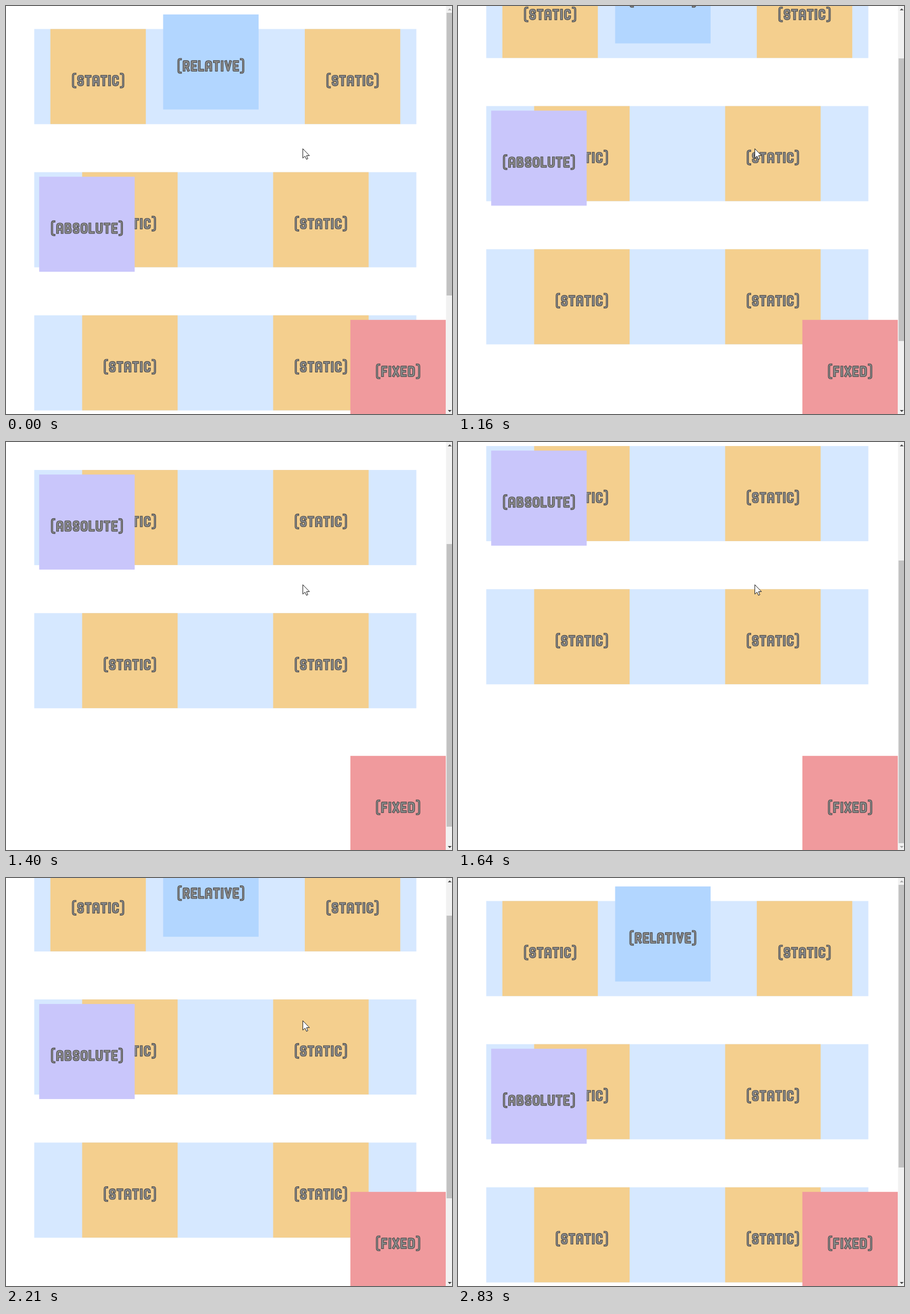
Write an HTML page that moves like this. It is 782 px wide and 716 px high and loops after 3600 ms.

```html
<!DOCTYPE html>
<html lang="en">
<head>
<meta charset="utf-8">
<title>CSS positioning</title>
<style>
  html, body { margin: 0; width: 100%; height: 100%; overflow: hidden; background: #fff; }
  svg { display: block; width: 782px; height: 716px; }
  .ink path { fill: none; stroke-linejoin: round; stroke-linecap: square; }
  .edge path { stroke: #4b4b4b; stroke-width: 4.7; }
  .core path { stroke: #8b8b8b; stroke-width: 2.5; }
  .edge .hook { stroke-width: 3.7; }
  .core .hook { stroke-width: 1.6; }
  text { font: 25px Roboto, sans-serif; text-anchor: middle; fill: none; }
</style>
</head>
<body>
<svg viewBox="0 0 782 716">
  <rect width="782" height="716" fill="#fff"/>
  <g id="page"></g>
  <g id="pinned"></g>
  <rect x="771.5" width="10.5" height="716" fill="#f1f1f1"/>
  <rect id="thumb" x="772.5" y="12" width="9.5" height="496" fill="#c1c1c1"/>
  <path id="up" d="M774.7 7.6L778 4.2L781.3 7.6Z"/>
  <path id="down" d="M774.7 709L778 712.4L781.3 709Z"/>
  <path id="cursor" d="M0 0V16.6L3.9 13.1L6.4 18.7L8.9 17.6L6.5 12.2H11.7Z" fill="#fff" stroke="#222" stroke-width="1" stroke-linejoin="round"/>
</svg>
<script>
const NS = 'http://www.w3.org/2000/svg';
const $ = id => document.getElementById(id);

function add(parent, tag, attrs) {
  const el = parent.appendChild(document.createElementNS(NS, tag));
  for (const k in attrs) el.setAttribute(k, attrs[k]);
  return el;
}

// Lettering skeletons: [advance, width, path], cap height 15.
const GLYPHS = {
  '[': [9, 4, 'M4 -4.3H3Q0 -4.3 0 -1V16Q0 19.3 3 19.3H4'],
  ']': [9, 4, 'M0 -4.3H1Q4 -4.3 4 -1V16Q4 19.3 1 19.3H0'],
  S: [13.5, 7.2, 'M7.2 3Q7.2 0 4.5 0H2.7Q0 0 0 3V4.5Q0 7.3 2.7 7.3H4.5Q7.2 7.3 7.2 10V12Q7.2 15 4.5 15H2.7Q0 15 0 12'],
  T: [13, 7.2, 'M0 0H7.2M3.6 0V15'],
  A: [14.5, 8, 'M0 15V4Q0 0 4 0Q8 0 8 4V15M0 9.5H8'],
  I: [7, 0, 'M0 0V15'],
  C: [14, 7.5, 'M7.5 3.5Q7.5 0 4 0H3.5Q0 0 0 3.5V11.5Q0 15 3.5 15H4Q7.5 15 7.5 11.5'],
  R: [14, 7.5, 'M0 15V0H4.5Q7.5 0 7.5 3V5.5Q7.5 8.5 4.5 8.5H0M4.5 8.5L7.5 15'],
  E: [13, 6.5, 'M6.5 0H0V15H6.5M0 7.5H5.5'],
  L: [12, 6.3, 'M0 0V15H6.3'],
  V: [14, 8, 'M0 0L4 15L8 0'],
  B: [14.5, 8, 'M0 0H4.5Q7.3 0 7.3 3V4.4Q7.3 7.3 4.5 7.3H0H5Q8 7.3 8 10.3V12Q8 15 5 15H0Z'],
  O: [14.5, 8, 'M0 4Q0 0 4 0Q8 0 8 4V11Q8 15 4 15Q0 15 0 11Z'],
  U: [14.5, 8, 'M0 0V11Q0 15 4 15Q8 15 8 11V0'],
  F: [12.5, 6.3, 'M6.3 0H0V15M0 7.5H5.3'],
  X: [14, 7.8, 'M0 0L7.8 15M7.8 0L0 15'],
  D: [14.5, 8, 'M0 0H4Q8 0 8 4V11Q8 15 4 15H0Z']
};

function lettering(parent, word, cx, cy) {
  const chars = [...`[${word}]`];
  const total = chars.reduce((sum, c) => sum + GLYPHS[c][0], 0);
  // Selectable copy beneath the drawn letterforms
  add(parent, 'text', { x: cx, y: cy + 9 }).textContent = `[${word}]`;
  for (const layer of ['edge', 'core']) {
    const g = add(parent, 'g', { class: 'ink ' + layer });
    let x = cx - total / 2;
    for (const c of chars) {
      const [adv, w, d] = GLYPHS[c];
      const path = add(g, 'path', { d, transform: `translate(${x + (adv - w) / 2} ${cy - 7.5})` });
      if (c === '[' || c === ']') path.setAttribute('class', 'hook');
      x += adv;
    }
  }
}

const SIZE = 167.4;
function box(parent, word, x, y, fill) {
  add(parent, 'rect', { x, y, width: SIZE, height: 166.8, fill });
  lettering(parent, word, x + SIZE / 2, y + 90.4);
}

const page = $('page');
const ROWS = [40.4, 291.6, 542.8];
const COLS = [[77.8, 523.9], [133.5, 468.4], [133.5, 468.4]];
ROWS.forEach((y, i) => {
  add(page, 'rect', { x: 49.5, y, width: 670, height: 167, fill: '#d6e8ff' });
  for (const x of COLS[i]) box(page, 'STATIC', x, y, '#f4cf8e');
});
box(page, 'RELATIVE', 275.5, 14.8, '#b2d6ff');
box(page, 'ABSOLUTE', 58.2, 299.6, '#c9c6fb');
box($('pinned'), 'FIXED', 603.8, 550.8, '#f09a9d');

// Wheel scrolling: [time, offset], each held until the next
const MAX = 284.5;
const SCROLL = [
  [0, 0], [980, 10.7], [1030, 32], [1070, 60], [1120, 90], [1160, 116],
  [1210, 147], [1260, 177], [1310, 204], [1350, 225], [1400, 242.5], [1450, 252],
  [1520, 258], [1560, 268], [1600, 279], [1640, MAX],
  [2030, 276], [2080, 237], [2120, 187], [2170, 130], [2210, 78.5],
  [2260, 38], [2310, 11], [2360, 0]
];

function render(t) {
  let y = 0;
  for (const [at, v] of SCROLL) if (t >= at) y = v;
  page.setAttribute('transform', `translate(0 ${-y})`);
  $('thumb').setAttribute('y', 12 + y * 0.689);
  $('up').setAttribute('fill', y > 0 ? '#404040' : '#a3a3a3');
  $('down').setAttribute('fill', y < MAX ? '#404040' : '#a3a3a3');
  const cursor = $('cursor');
  cursor.setAttribute('transform', t < 2770 ? 'translate(520.4 250.4)' : 'translate(596.8 253.8)');
  cursor.setAttribute('visibility', t < 2830 ? 'visible' : 'hidden');
}

const start = performance.now();
function tick() {
  render((performance.now() - start) % 3600);
  requestAnimationFrame(tick);
}
render(0);
requestAnimationFrame(tick);
</script>
</body>
</html>
```
